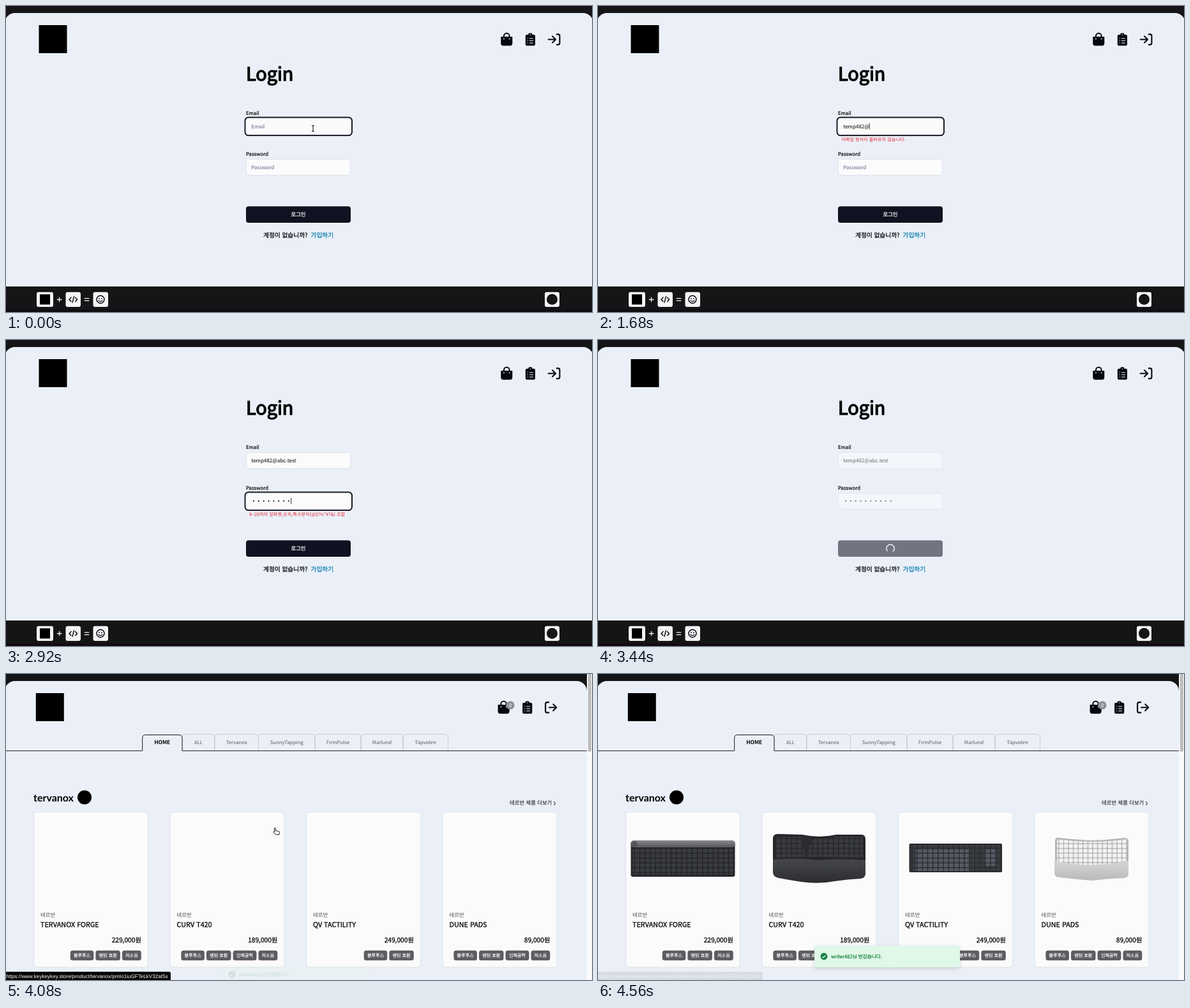
Animation of 918 by 480 pixels, one loop 4.64 s. Source, as an HTML page:

```html
<!DOCTYPE html>
<html lang="ko">
<head>
<meta charset="utf-8">
<title>Login</title>
<style>
html, body { margin: 0; width: 100%; height: 100%; overflow: hidden; background: #151518; }
svg { display: block; }
text { font-family: "Noto Sans CJK KR", "Noto Sans CJK", "Noto Sans KR", sans-serif; white-space: pre; text-rendering: geometricPrecision; }
.medium { fill: currentColor; stroke: currentColor; stroke-width: .026em; }
.heavy { stroke: #000; stroke-width: .048em; }
.line { fill: none; stroke: #05060f; stroke-linecap: round; stroke-linejoin: round; }
.field { fill: #fbfbfc; stroke: #dde1e9; }
.ring { fill: #fbfbfc; stroke: #05060f; stroke-width: 1.8; }
.error { fill: #e2232e; }
.hint { fill: #5a6280; }
</style>
</head>
<body>
<svg id="stage" width="918" height="480" viewBox="0 0 918 480"></svg>
<script>
const LOOP = 4640, HOME_AT = 4000, SUBMIT_AT = 3240, FOCUS_PASSWORD = 2080;
const BG = '#ebf0f8', INK = '#05060f';
const EMAIL = 'temp482@abc.test';
const emailKeys = [40, 140, 260, 400, 640, 880, 1200, 1440];
for (let i = 0; i < 8; i++) emailKeys.push(1720 + i * 28);
const passKeys = [];
for (let i = 0; i < 8; i++) passKeys.push(2360 + i * 80);
passKeys.push(3040, 3160);

const text = (x, y, size, str, attrs = '') => `<text x="${x}" y="${y}" font-size="${size}" ${attrs}>${str}</text>`;
const rect = (x, y, w, h, r, attrs = '') => `<rect x="${x}" y="${y}" width="${w}" height="${h}" rx="${r}" ${attrs}/>`;
const circle = (x, y, r, attrs = '') => `<circle cx="${x}" cy="${y}" r="${r}" ${attrs}/>`;
const path = (d, attrs = '') => `<path d="${d}" ${attrs}/>`;
const group = (id, body, attrs = '') => `<g id="${id}" ${attrs}>${body}</g>`;
const middle = 'text-anchor="middle"', medium = 'class="medium"';
const keyTiles = (id, w, h, fill) =>
  `<pattern id="${id}" width="${w}" height="${h}" patternUnits="userSpaceOnUse">${rect(.5, .5, w - 1.4, h - 1.5, 1, `fill="${fill}"`)}</pattern>`;

const header = () =>
  rect(51.5, 30, 44, 44, 0, 'fill="#000"') +
  path('M775.6 48.5h17.4v10.5q0 3-3 3h-11.4q-3 0-3-3z', `fill="${INK}" stroke="${INK}" stroke-width=".6" stroke-linejoin="round"`) +
  path('M780 49v-2a4.3 4.3 0 0 1 8.6 0v2', 'class="line" stroke-width="2"') +
  circle(780, 51.5, .9, `fill="${BG}"`) + circle(788.6, 51.5, .9, `fill="${BG}"`) +
  rect(813.8, 45, 15.2, 17.2, 2.2, `fill="${INK}"`) + rect(818.2, 42.6, 6.4, 5, 2.2, `fill="${INK}"`) +
  circle(821.4, 45.2, .8, `fill="${BG}"`) +
  [51, 54.5, 58].map(y => path(`M816.7 ${y}h1.2m2 0h6`, `stroke="${BG}" stroke-width="1.2"`)).join('');

const footer = () =>
  rect(0, 440, 918, 40, 0, 'fill="#151518"') + rect(0, 476, 918, 4, 0, 'fill="#100c11"') +
  [[48, 26], [93.5, 23.5], [136.5, 23.5], [844, 23]].map(([x, w]) => rect(x, 448.7, w, 23.2, 3, 'fill="#f4f4f5"')).join('') +
  rect(53, 452.3, 16, 16, 0, 'fill="#000"') +
  path('M79.8 460.5h7.6M83.6 456.7v7.6M122.8 458.6h7.4M122.8 462.4h7.4', 'stroke="#f4f4f5" stroke-width="1.3"') +
  path('M102 457.2l-3 3.2 3 3.2M108.6 457.2l3 3.2-3 3.2M106.5 455.8l-2.4 9.2', 'class="line" stroke-width="1.4"') +
  circle(148, 460.3, 6, 'class="line" stroke-width="1.4"') +
  circle(146, 458.8, .9) + circle(150, 458.8, .9) +
  path('M145 461.8q3 3.4 6 0', 'class="line" stroke-width="1.2"') +
  circle(855.5, 460.3, 8.5, 'fill="#151518"');

const login = () =>
  rect(-2, 11, 922, 460, 16, `fill="${BG}"`) + header() +
  path('M849.7 52.5h11M856 47.4l5.1 5.1-5.1 5.1M862.8 44.4h2q2.6 0 2.6 2.6v11q0 2.6-2.6 2.6h-2', 'class="line" stroke-width="2.1"') +
  text(376, 117, 28.8, 'Login', 'class="heavy"') +
  text(376, 171, 7.8, 'Email', medium) + text(376, 235, 7.8, 'Password', medium) +
  rect(374.5, 174.6, 167.5, 28.6, 5.5, 'id="emailRing" class="ring"') +
  rect(374.5, 238.6, 167.5, 28.6, 5.5, 'id="passRing" class="ring"') +
  group('fields',
    rect(376.3, 176.5, 163.4, 25, 4, 'class="field"') + rect(376.3, 240.5, 163.4, 25, 4, 'class="field"') +
    text(384.3, 191.5, 8, 'Email', 'id="emailHint" class="hint"') + text(384.3, 255.5, 8, 'Password', 'id="passHint" class="hint"') +
    text(384.3, 191.5, 8, '', 'id="email"') +
    group('dots', passKeys.map((_, i) => circle(388 + i * 7.85, 252.6, 1.05)).join(''))) +
  path('M0 0v10', 'id="caret" stroke="#000" stroke-width=".8"') +
  text(381, 212, 7.2, '이메일 형식이 올바르지 않습니다.', 'id="emailError" class="error"') +
  text(381, 276, 7.2, '8~20자의 알파벳,숫자,특수문자(@$!%*#?&amp;) 조합', 'id="passError" class="error"') +
  rect(376, 314.3, 164, 25.6, 4, 'id="button" fill="#0f1221"') +
  text(458, 329.5, 8.4, '로그인', `id="buttonText" color="#fff" ${medium} ${middle}`) +
  circle(458, 327, 6.2, 'id="spinner" fill="none" stroke="#eef0f5" stroke-width="1.5" stroke-dasharray="29.2 9.8"') +
  text(403, 363, 9.7, '계정이 없습니까?', medium) + text(477.5, 363, 9.7, '가입하기', `color="#0b7bb0" ${medium}`) +
  footer();

const tabs = [['ALL', 276, 327], ['Tervanox', 327, 395.5], ['SunnyTapping', 395.5, 484], ['FirmPulse', 484, 556], ['Marlund', 556, 622], ['Tapvolen', 622, 692.5]];
const tabBox = (x1, x2, y) => `M${x1} 120.5V${y + 5}q0-5 5-5H${x2 - 5}q5 0 5 5V120.5`;

const tagWidth = { '블루투스': 36.5, '펜텀 호환': 38.5, '인체공학': 36.8, '저소음': 29.8 };
const [BLUE, COMPAT, ERGO, QUIET] = Object.keys(tagWidth);
const products = [
  ['TERVANOX FORGE', '229,000', [BLUE, COMPAT, QUIET]],
  ['CURV T420', '189,000', [BLUE, COMPAT, ERGO, QUIET]],
  ['QV TACTILITY', '249,000', [BLUE, COMPAT]],
  ['DUNE PADS', '89,000', [BLUE, COMPAT, ERGO, QUIET]]
];

function card([name, price, tags], i) {
  const x = 43.5 + i * 213.5;
  let right = x + 168.3, out = rect(x, 216.3, 179, 243.7, 5, 'class="field"') +
    text(x + 10.5, 381, 8.4, '테르반', 'fill="#4b4d55" font-weight="300"') +
    text(x + 10.5, 397, 10.8, name, medium) +
    text(right, 421, 10.2, price + '원', `text-anchor="end" ${medium}`);
  for (const tag of [...tags].reverse()) {
    const w = tagWidth[tag];
    out += rect(right - w, 433.8, w, 15.4, 3.5, 'fill="#5d5d61"') +
      text(right - w / 2, 444.2, 7.1, tag, `color="#fff" ${medium} ${middle}`);
    right -= w + 3.1;
  }
  return out;
}

const photos = [
  rect(51.5, 264, 163, 54, 3, 'fill="#232427"') + rect(51, 261, 164, 11, 5, 'fill="url(#steel)"') +
    circle(57, 267, 5, 'fill="#55575a"') + rect(54, 274, 158, 41, 1, 'fill="url(#darkKeys)"'),
  path('M274 257q1-7 10-6l36 1q27 6 53 0h39q7 0 7 7v34H274z', 'fill="#25262a"') +
    path('M278 256l42-1q27 6 53 0h42v34q-68-4-137 0z', 'fill="url(#darkKeys)"') +
    path('M318 253l8 38 10-35z', 'fill="#2b2c30"') +
    path('M274 291q36-3 72 1 36-3 73 0v21q0 7-8 8-20 1-40 4-25 5-53 1-19-3-35-6-9-2-9-9z', 'fill="url(#rubber)"'),
  rect(487.5, 266, 145.5, 45, 2, 'fill="#2b2c31"') + rect(490, 268.5, 140.5, 40, 1, 'fill="url(#darkKeys)"') +
    rect(498, 275, 83, 34, 0, 'fill="#2b2c31"') + rect(498, 275, 83, 34, 0, 'fill="url(#greyKeys)"') +
    rect(606, 275, 17, 26, 0, 'fill="url(#greyKeys)"'),
  path('M716 262q0-6 7-5 25 3 52 4 25-1 50-4 6 0 6 6v42H716z', 'fill="#b4b5b8"') +
    path('M719 259q28 4 56 4 27 0 53-4v34q-53 13-109 4z', 'fill="url(#lightKeys)"') +
    path('M715 293q58 13 116 0v20q0 6-7 7-25 1-50 4-25-2-52-5-7-1-7-7z', 'fill="url(#silver)"')
];

const home = () =>
  rect(-2, 11, 912, 500, 16, `fill="${BG}"`) +
  group('homeHeader', header(), 'transform="translate(-4.7 0)"') +
  circle(790, 49, 6.6, 'fill="#8c909c"') + text(790, 51.8, 7.5, '0', `fill="#fff" ${middle}`) +
  path('M850.3 44.4h-2.6q-2.6 0-2.6 2.6v11q0 2.6 2.6 2.6h2.6M851 52.5h11M857.2 47.4l5.1 5.1-5.1 5.1', 'class="line" stroke-width="2.1"') +
  tabs.map(([name, a, b]) => path(tabBox(a, b, 94.5), 'fill="none" stroke="#c5c9d0"') +
    text((a + b) / 2, 109.5, 7.8, name, `fill="#555962" font-weight="300" ${middle}`)).join('') +
  path('M0 120.5H213.7M276 120.5H910', 'stroke="#25262c"') +
  path(tabBox(213.7, 276, 95.5), `fill="${BG}" stroke="#15161c"`) +
  text(244.7, 110, 8.4, 'HOME', `font-weight="700" ${middle}`) +
  text(43, 200, 16, 'tervanox', 'font-weight="700" style="font-family:Lato,sans-serif"') + circle(123, 193.5, 11) +
  text(789, 205.3, 8.4, '테르반 제품 더보기') + path('M858.3 200.3l2.4 2.7-2.4 2.7', 'class="line" stroke-width="1"') +
  products.map(card).join('') + photos.map((p, i) => group('photo' + i, p)).join('') +
  group('toast',
    rect(339, 426, 228, 34, 4, 'fill="#e0f8e8" filter="url(#shadow)"') + circle(354, 443, 5.4, 'fill="#15803d"') +
    path('M351.6 443.2l1.7 1.7 3.2-3.5', 'fill="none" stroke="#fff" stroke-width="1.2"') +
    text(365, 445.6, 7.6, 'writer482님 반갑습니다.', `color="#15803d" ${medium}`)) +
  group('status',
    path('M0 467H255q3 0 3 3v10H0z', 'fill="#050506"') +
    text(0, 477, 8.15, 'https://www.keykeykey.store/product/tervanox/pmIo1iuGFTeLkV32at5s', 'fill="#fff" style="font-family:\'Liberation Sans\',Arial,sans-serif"')) +
  rect(910, 0, 8, 480, 0, 'fill="#fafafa"') + rect(911.7, -4, 5.2, 126, 2.6, 'fill="#bdbdc0"');

const gradient = (id, a, b) => `<linearGradient id="${id}" x2="0" y2="1"><stop stop-color="${a}"/><stop offset="1" stop-color="${b}"/></linearGradient>`;
const stage = document.getElementById('stage');
stage.innerHTML = '<defs>' +
  keyTiles('darkKeys', 8.2, 7.6, '#393b3f') + keyTiles('greyKeys', 8.2, 7.6, '#555a65') + keyTiles('lightKeys', 7.6, 7.4, '#f3f3f4') +
  gradient('steel', '#86888b', '#57595c') + gradient('silver', '#d6d6d8', '#b8b9bb') + gradient('rubber', '#45474b', '#2c2d31') +
  '<filter id="shadow" x="-10%" y="-40%" width="120%" height="190%"><feDropShadow dx="0" dy="2" stdDeviation="3" flood-opacity=".15"/></filter></defs>' +
  rect(0, 0, 918, 480, 0, 'fill="#151518"') + group('login', login()) + group('home', home()) +
  path('M479 187.3q2 0 2 1.4 0-1.4 2-1.4M481 188.5v7.2M479 197q2 0 2-1.4 0 1.4 2 1.4', 'id="beam" fill="none" stroke="#000"') +
  group('arrow', path('M0 0v9.6l2.2-2 1.5 3.4 1.7-.8-1.5-3.3h3z', 'fill="#000" stroke="#fff" stroke-width=".7"')) +
  group('blocked', circle(7, 15, 5.2, 'fill="#eee" stroke="#85878c" stroke-width="1.6"') + path('M3.4 11.4l7.2 7.2', 'stroke="#85878c" stroke-width="1.6"')) +
  group('hand', path('M-1 1q1-1.6 2 0v4l5 1q1.3 .3 1.2 1.7l-.7 3.3h-5.5l-3.5-4q.6-1.5 2 0z', 'fill="#fff" stroke="#000" stroke-width=".9" stroke-linejoin="round"'));

const el = id => document.getElementById(id);
const show = (id, on) => el(id).setAttribute('visibility', on ? 'inherit' : 'hidden');
const set = (id, name, value) => el(id).setAttribute(name, value);
const clamp = v => Math.max(0, Math.min(1, v));
const typed = (keys, t) => keys.filter(k => k <= t).length;

const stops = [[3840, 533, 251], [4080, 422, 241], [4320, 281, 192]];
function pointer(t) {
  let [, x, y] = stops[0];
  for (let i = 1; i < stops.length; i++) {
    const [t0, x0, y0] = stops[i - 1], [t1, x1, y1] = stops[i];
    if (t >= t0) {
      const k = clamp((t - t0) / (t1 - t0));
      x = x0 + (x1 - x0) * k;
      y = y0 + (y1 - y0) * k;
    }
  }
  return [x, y];
}

function drawLogin(t) {
  const n = typed(emailKeys, t), m = typed(passKeys, t);
  const onPass = t >= FOCUS_PASSWORD, busy = t >= SUBMIT_AT;
  el('email').textContent = EMAIL.slice(0, n);
  show('emailHint', !n);
  show('passHint', !m);
  [...el('dots').children].forEach((dot, i) => dot.setAttribute('visibility', i < m ? 'inherit' : 'hidden'));
  show('emailRing', !onPass);
  show('passRing', onPass && !busy);
  show('emailError', n > 0 && n < EMAIL.length);
  show('passError', m > 0 && m < passKeys.length);
  set('fields', 'opacity', busy ? .55 : 1);
  set('button', 'opacity', busy ? .55 : 1);
  show('buttonText', !busy);
  show('spinner', busy);
  set('spinner', 'transform', `rotate(${-80 + (t - 3840) * .36} 458 327)`);

  const last = onPass ? (m ? passKeys[m - 1] : FOCUS_PASSWORD) : emailKeys[n - 1];
  show('caret', !busy && (onPass || n > 0) && (t - last) % 1000 < 500);
  const x = onPass ? 384.3 + m * 7.8 : 384.6 + (n ? el('email').getComputedTextLength() : 0);
  set('caret', 'transform', `translate(${x} ${onPass ? 247.6 : 183.6})`);
}

function drawHome(t) {
  [4480, 4240, 4400, 4440].forEach((at, i) => show('photo' + i, t >= at));
  const k = clamp((t - 4050) / 230), rise = 1 - (1 - k) ** 2;
  set('toast', 'transform', `translate(0 ${38 * (1 - rise)})`);
  set('toast', 'opacity', k);
  show('status', t >= 4050);
  set('status', 'opacity', clamp((4570 - t) / 110));
}

function draw(t) {
  const atHome = t >= HOME_AT;
  show('login', !atHome);
  show('home', atHome);
  if (atHome) drawHome(t); else drawLogin(t);

  const [x, y] = pointer(t), visible = t >= 3600 && t < 4440;
  const overCard = atHome && x > 257 && x < 436 && y > 216;
  show('beam', t < emailKeys[0]);
  show('arrow', visible && !overCard);
  show('blocked', visible && !atHome);
  show('hand', visible && overCard);
  for (const id of ['arrow', 'blocked', 'hand']) set(id, 'transform', `translate(${x} ${y})`);
}

const start = performance.now();
function frame() {
  draw((performance.now() - start) % LOOP);
  requestAnimationFrame(frame);
}
frame();
</script>
</body>
</html>
```
